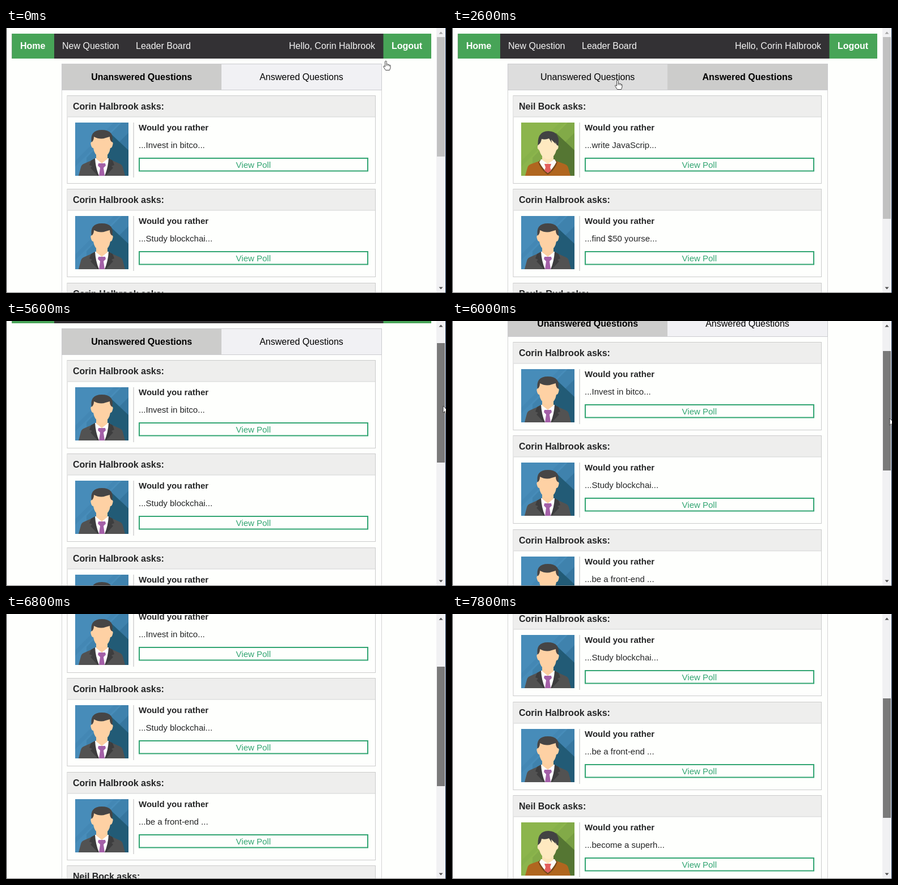
An HTML page that plays this animation: 776x468 px, repeating every 8000 ms.

```html
<!DOCTYPE html>
<html lang="en">
<head>
<meta charset="utf-8">
<title>Would you rather</title>
<style>
html, body { margin: 0; width: 100%; height: 100%; overflow: hidden; background: #fefffd; }
svg { display: block; width: 776px; height: 468px; font: 16px "Liberation Sans", Arial, sans-serif; }
.b { font-weight: bold; }
.s { font-size: 15px; }
.m { text-anchor: middle; }
</style>
</head>
<body>
<svg id="stage" viewBox="0 0 776 468"></svg>
<script>
const stage = document.getElementById('stage');
const LOOP = 8000, STEP = 200, PITCH = 165.3;
const CORIN = 'Corin Halbrook', NEIL = 'Neil Bock', PAULA = 'Paula Rud';

const lists = {
  open: [[CORIN, 'Invest in bitco'], [CORIN, 'Study blockchai'], [CORIN, 'be a front-end '], [NEIL, 'become a superh']],
  done: [[NEIL, 'write JavaScrip'], [CORIN, 'find $50 yourse'], [PAULA, '']]
};

const rect = (x, y, w, h, fill, extra = '') =>
  `<rect x="${x}" y="${y}" width="${w}" height="${h}" fill="${fill}" ${extra}/>`;
const text = (x, y, str, cls = '', fill = '#242526') =>
  `<text x="${x}" y="${y}" class="${cls}" fill="${fill}">${str}</text>`;
const path = (d, fill, extra = '') => `<path d="${d}" fill="${fill}" ${extra}/>`;

// Flat backdrop: diagonal bands plus the long shadow of the head
const backdrop = ([light, mid, dark, shade]) =>
  rect(0, 0, 94, 94, light) +
  path('M94 0V94H20V62L82 0Z', mid) + path('M94 18V94H40V72Z', dark) +
  path('M0 68L68 0H78L0 78Z', mid, 'opacity=".45"') +
  path('M61 18L94 49V94H40V60Z', shade);

const suit =
  backdrop(['#478cb9', '#3f82ad', '#36769f', '#225b76']) +
  path('M6 94L10 79Q11 74 17 72L35 64H59L77 72Q83 74 84 79L88 94Z', '#525252') +
  path('M35 63L28 67 25 75 30 77 27 80 40 94H54L67 80 64 77 69 75 66 67 59 63Z', '#3d3d3e') +
  path('M35 63H59Q58 80 52 94H42Q36 80 35 63Z', '#fefefe') +
  path('M37 50H57V64L47 72 37 64Z', '#fdcfa1') +
  path('M41 72H53L54 76 50 80 52 94H42L44 80 40 76Z', '#a460a8') +
  path('M29 36Q25 13 47 13Q70 13 65 36Z', '#464545') +
  path('M30 34Q33 31 33 25Q44 31 54 27L61 25Q61 31 64 34Q68 34 66 40Q65 45 62 45Q60 57 52 61Q47 64 42 61Q34 57 32 45Q29 45 28 40Q26 34 30 34Z', '#fed1a4');

const sweater =
  backdrop(['#8cb54c', '#82aa48', '#779e43', '#557633']) +
  path('M7 94L11 80Q12 75 18 73L35 67H59L76 73Q82 75 83 80L87 94Z', '#b0661f') +
  path('M34 66L30 70Q35 84 47 92Q59 84 64 70L60 66Z', '#774819') +
  path('M35 65L32 70Q38 82 47 89Q56 82 62 70L59 65Z', '#fcfcfa') +
  path('M37 50H57V66L47 73 37 66Z', '#fbe3b6') +
  path('M41 73H53L51 79 53 85 47 89 41 85 43 79Z', '#e35f5e') +
  path('M30 46Q26 15 48 15Q72 16 64 46Z', '#424343') +
  path('M31 39Q35 36 36 29Q43 31 49 28L54 36 53 30 61 38 60 34L63 40Q67 40 65 46L62 49Q59 60 52 63Q47 66 42 63Q35 60 32 49L29 46Q28 40 31 39Z', '#fee9c0');

const card = ([name, choice], i) => {
  const green = '#32a572';
  return `<g transform="translate(0 ${Math.round(i * PITCH)})">` +
    rect(108, 119.5, 543.5, 155, '#fefffd', 'stroke="#cbcbcb"') +
    rect(108.5, 120, 542.5, 37, '#eeeeed') + rect(108.5, 156.5, 542.5, 1, '#d6d6d6') +
    text(118, 144, name + ' asks:', 'b') +
    `<use href="#${name === NEIL ? 'sweater' : 'suit'}" x="122" y="167"/>` +
    rect(224, 167, 2, 97, '#dcdcdc') +
    text(234, 181, 'Would you rather', 'b s') +
    text(234, 212, `...${choice}...`, 's') +
    rect(235, 230, 403, 22.5, 'none', `stroke="${green}" stroke-width="2"`) +
    text(436.3, 246.5, 'View Poll', 's m', green) + '</g>';
};

stage.innerHTML =
  `<defs><g id="suit">${suit}</g><g id="sweater">${sweater}</g></defs>` +
  rect(0, 0, 776, 468, '#fefffd') +
  '<g id="page">' +
    rect(10.5, 10, 739.5, 44, '#333134') + rect(10.5, 10, 74.5, 44, '#47a457') + rect(665.5, 10, 84.5, 44, '#47a457') +
    text(25, 37, 'Home', 'b', '#fff') + text(99, 37, 'New Question', '', '#f4f4f4') +
    text(229, 37, 'Leader Board', '', '#f4f4f4') + text(499, 37, 'Hello, ' + CORIN, '', '#f4f4f4') +
    text(680, 37, 'Logout', 'b', '#fff') +
    rect(98.5, 63.5, 564, 46, '#f1f1f4', 'stroke="#cbcbcf"') +
    rect(99, 64, 281, 45, '', 'id="tabL"') + rect(380, 64, 282, 45, '', 'id="tabR"') +
    '<text id="labelL" x="239.2" y="92" class="m">Unanswered Questions</text>' +
    '<text id="labelR" x="521" y="92" class="m">Answered Questions</text>' +
    rect(98, 110, 1, 860, '#d4d4d4') + rect(662, 110, 1, 860, '#d4d4d4') +
    `<g id="open">${lists.open.map(card).join('')}</g>` +
    `<g id="done">${lists.done.map(card).join('')}</g>` +
  '</g>' +
  rect(759, 0, 16, 468, '#f1f1f3') +
  path('M763.5 10.5L767 6.5 770.5 10.5Z', '', 'id="up"') +
  path('M763.5 457.5L767 461.5 770.5 457.5Z', '#505050') +
  rect(760, 16, 14, 211, '', 'id="thumb"') +
  rect(0, 0, 1, 468, '#111') + rect(0, 467, 776, 1, '#767676') + rect(775, 0, 1, 468, '#10284c') +
  '<g id="cursor" fill="#fff" stroke="#333" stroke-width=".9" stroke-linejoin="round">' +
    '<path id="hand" d="M-1.5 1Q0 -.8 1.2 1V6Q3 5 4 6.6Q5.6 5.8 6.4 7.4Q8 7 8 9V12L6.5 16.5H-.5L-4.3 10.5Q-4.5 8.6 -2.8 9.2L-1.5 10.5ZM1.2 6V9M4 6.6V9.2M6.4 7.4V9.6"/>' +
    '<path id="arrow" d="M0 0V12L2.8 9.5 4.8 14 6.6 13.2 4.8 8.8H8.6Z"/></g>';

const el = id => document.getElementById(id);
const set = (id, attrs) => { for (const k in attrs) el(id).setAttribute(k, attrs[k]); };
const show = (id, on) => set(id, { visibility: on ? 'visible' : 'hidden' });

// Linear interpolation through rows of [time, values...]
function along(keys, t, col = 1) {
  let i = 0;
  while (i < keys.length - 2 && t >= keys[i + 1][0]) i++;
  const a = keys[i], b = keys[i + 1];
  const p = Math.min(1, Math.max(0, (t - a[0]) / (b[0] - a[0])));
  return a[col] + (b[col] - a[col]) * p;
}

const scrollKeys = [[5400, 0], [5600, 50], [6400, 114], [6800, 171], [7800, 295]];
const moveKeys = [[0, 670, 58], [600, 552, 88], [1400, 540, 92], [2600, 292, 92], [3600, 292, 92],
  [4200, 676, 124], [4600, 745, 128], [5000, 768, 128], [5400, 769, 128], [5600, 771, 150],
  [6400, 773, 193], [6800, 778, 214]];

function draw(now) {
  const t = Math.floor(now % LOOP / STEP) * STEP;
  const done = t >= 800 && t < 3600;
  const scroll = Math.round(along(scrollKeys, t));
  const x = along(moveKeys, t), y = along(moveKeys, t, 2);
  const over = (a, b) => t < 4000 && y > 64 && x > a && x < b;
  const tabFill = (active, hover) => active ? '#cccccb' : hover ? '#dddddd' : '#f1f1f4';

  set('page', { transform: `translate(0 ${-scroll})` });
  set('tabL', { fill: tabFill(!done, over(99, 380)) });
  set('tabR', { fill: tabFill(done, over(380, 662)) });
  set('labelL', { class: done ? 'm' : 'm b' });
  set('labelR', { class: done ? 'm b' : 'm' });
  show('open', !done);
  show('done', done);

  set('thumb', {
    y: 16 + Math.round(scroll * 211 / 468),
    height: done ? 321 : 211,
    fill: t >= 5200 ? '#7a7a7a' : t >= 5000 ? '#a8a8a8' : '#c1c1c1'
  });
  set('up', { fill: scroll ? '#505050' : '#a3a3a3' });

  set('cursor', { transform: `translate(${Math.round(x)} ${Math.round(y)})` });
  show('hand', t < 4000);
  show('arrow', t >= 4000);
}

const start = performance.now();
function tick() {
  draw(performance.now() - start);
  requestAnimationFrame(tick);
}
tick();
</script>
</body>
</html>
```
